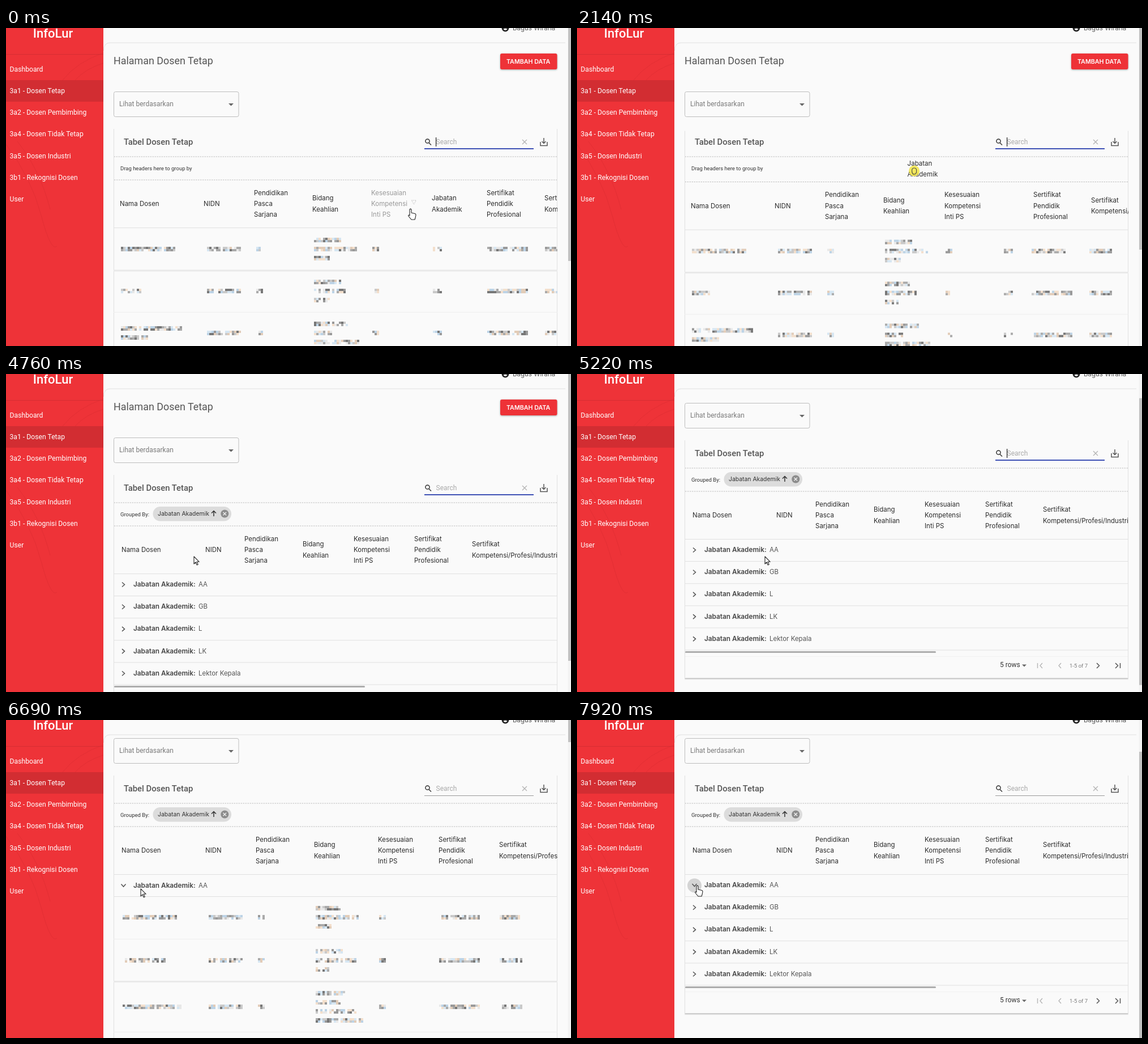
Write an HTML page that moves like this. It is 998x561 px and loops after 8 s.

```html
<!DOCTYPE html>
<html lang="id">
<head>
<meta charset="utf-8">
<title>Dosen Tetap</title>
<style>
html, body { margin: 0; width: 100%; height: 100%; overflow: hidden; background: #fafafa; }
#stage { display: block; width: 998px; height: 561px; }
text { font: 12px Roboto, sans-serif; fill: #333; white-space: pre; }
.geo { font: 400 11.5px Inter, sans-serif; fill: #2c2c2c; }
.thin { fill: #555; }
.tag { font-size: 10.4px; fill: #333; }
.bold { font: 600 11.8px Inter, sans-serif; fill: #444; }
.small { font-size: 9.5px; }
.menu { font-size: 12.2px; fill: #fff; }
.logo { font-size: 22px; font-weight: 500; fill: #fff; text-anchor: middle; }
.h1 { font-size: 17.9px; fill: #555; }
.h2 { font-size: 14.8px; font-weight: 500; fill: #555; }
.soft { fill: #7a7a7a; }
.hint { fill: #aaa; }
.btn { font: 600 10.7px Inter, sans-serif; fill: #fff; }
.line { stroke: #e0e0e0; fill: none; }
.faint { stroke: #eeeeee; fill: none; }
.thick { stroke: #e9e9e9; stroke-width: 3; fill: none; }
.icon { stroke: #555; stroke-width: 1.5; fill: none; }
.pale { stroke: #b5b5b5; stroke-width: 1.4; fill: none; }
.vein { stroke: #e32f34; fill: none; }
</style>
</head>
<body>
<svg id="stage" viewBox="0 0 998 561"></svg>
<script>
const LOOP = 8000;
const HEADS = ['Nama Dosen', 'NIDN', 'Pendidikan|Pasca|Sarjana', 'Bidang|Keahlian',
  'Kesesuaian|Kompetensi|Inti PS', 'Jabatan|Akademik',
  'Sertifikat|Pendidik|Profesional', 'Sertifikat|Kompetensi/Profesi/Industri'];
const MENU = ['Dashboard', '3a1 - Dosen Tetap', '3a2 - Dosen Pembimbing',
  '3a4 - Dosen Tidak Tetap', '3a5 - Dosen Industri', '3b1 - Rekognisi Dosen', 'User'];
const RANKS = ['AA', 'GB', 'L', 'LK', 'Lektor Kepala'];
const TONES = ['#777', '#aaa', '#c9c9c9', '#f3dfcc', '#e2ccb8', '#bcd3e6', '#d6e6f2', '#e8e8e8', '#999'];

const text = (x, y, s, cls = '') => `<text x="${x}" y="${y}" class="${cls}">${s}</text>`;
const path = (d, cls, extra = '') => `<path d="${d}" class="${cls}" ${extra}/>`;
const rect = (x, y, w, h, extra) => `<rect x="${x}" y="${y}" width="${w}" height="${h}" ${extra}/>`;
const rule = (y, cls = 'line') => path(`M190 ${y}H974`, cls);
const group = (id, inner) => `<g id="${id}">${inner}</g>`;

// Header label, its lines centred on cy
function label(s, x, cy) {
  const parts = s.split('|');
  return parts.map((p, k) => text(x, cy + 4 + (k - (parts.length - 1) / 2) * 19.2, p, 'geo')).join('');
}
const heads = xs => HEADS.map((h, i) => xs[i] ? `<g class="col${i}">${label(h, xs[i], 310)}</g>` : '').join('');

function random(seed) {
  let a = seed * 2654435761 >>> 0;
  return () => {
    a = a + 0x6D2B79F5 >>> 0;
    let r = Math.imul(a ^ a >>> 15, a | 1);
    r ^= r + Math.imul(r ^ r >>> 7, r | 61);
    return ((r ^ r >>> 14) >>> 0) / 4294967296;
  };
}

// One line of pixelated text, centred on cy
function mosaic(x, cy, width, rnd) {
  const d = TONES.map(() => '');
  for (let i = 0; i < width; i += 4) {
    const gap = rnd() < .08;
    for (let j = -4; j < 4; j += 4) {
      const tone = Math.floor(rnd() * TONES.length);
      if (!gap && rnd() < .92) d[tone] += `M${x + i} ${cy + j}h4v4h-4z`;
    }
  }
  return d.map((p, i) => p && `<path d="${p}" fill="${TONES[i]}"/>`).join('');
}

// A row is [centre, name widths, field widths]
function rows(list, xs, seed) {
  const shift = [2, 6, 4, 3, 2, 2, 1, 1];
  return list.map(([cy, name, field], r) => xs.map((x, i) => {
    if (!x) return '';
    const lines = [name, [58], [10], field, [12], [14], [72], [38]][i];
    const rnd = random(seed * 97 + r * 11 + i + 1);
    return lines.map((w, k) => mosaic(x + shift[i], cy + (k - (lines.length - 1) / 2) * 16, w, rnd)).join('');
  }).join('')).join('');
}

const FLAT = [[390, [94], [48, 76, 26]], [464, [35], [45, 55, 26]], [538, [108, 45], [58, 30, 78]]];
const OPEN = [[428, [94], [48, 74, 26]], [504, [75], [48, 70, 22]], [586, [104], [50, 44, 70, 82]]];
const frame = bottom => path(`M190.5 178V${bottom}M973.5 178V${bottom}`, 'line');
const flat = (xs, cells, seed) => frame(720) + rule(352.5) + rule(428, 'thick') + rule(501.5, 'faint')
  + heads(xs) + rows(FLAT, cells, seed);
const chevron = (y, id = '') => `<g transform="translate(207.5 ${y})">${path('M-2.5-4L2 0L-2.5 4', 'icon', id)}</g>`;
const rank = (s, cy, id) => chevron(cy + .5, id) + text(225, cy + 4, 'Jabatan Akademik:', 'bold') + text(340, cy + 4, s, 'geo thin');

const LEFT = [201, 349, 438, 541];
const A = [...LEFT, 645, 752, 849, 951];
const B = [...LEFT, 649, 0, 806, 908];
const D = [...LEFT, 645, 0, 801, 903];
const SHUT = [204, 352, 421, 524, 614, 0, 721, 823];
const WIDE = [204, 352, 441, 544, 657, 0, 764, 871];
const withRank = xs => xs.map((x, i) => i === 5 ? 752 : x > 800 ? x - 4 : x);

const scenes = {
  start: flat(A, A, 1),
  lifted: flat(B, withRank(B), 1),
  over: flat(B, withRank(B), 2),
  settled: flat(D, withRank(D), 3),
  shut: rect(190, 560, 784, 37.5, 'fill="#fafafa" style="filter:drop-shadow(0 1px 1px #0006)"') + frame(597) + heads(SHUT)
    + RANKS.map((s, i) => rule(352.5 + i * 39.1) + rank(s, 371 + i * 39.2, i ? '' : 'id="turn"')).join('')
    + rule(548) + rect(191, 550, 443, 3, 'rx="1.5" fill="#adadad"')
    + text(747, 578, '5 rows') + text(870, 578.5, '1-5 of 7', 'small soft')
    + path('M786 573.5h8l-4 4z', '', 'fill="#666"')
    + path('M813.5 571v9M822 571l-4 4.5 4 4.5M855 571l-4 4.5 4 4.5', 'pale')
    + path('M918 571l4.5 4.5-4.5 4.5M951 571l4.5 4.5-4.5 4.5M959.5 571v9', 'icon'),
  open: frame(720) + rule(352.5) + rule(391.5) + rule(466.5, 'faint') + rule(541.5, 'thick') + rule(630.5, 'faint')
    + heads(WIDE) + rank('AA', 371.5, 'id="turned"') + rows(OPEN, WIDE, 5)
};

const toolbar = text(208, 206, 'Tabel Dosen Tetap', 'h2')
  + '<g class="icon" style="stroke:#333"><circle cx="744.5" cy="199.5" r="3.6"/><path d="M747 202.5l4 4"/></g>'
  + text(759.5, 205, 'Search', 'hint')
  + path('M912 197l8 8M920 197l-8 8', 'pale')
  + rect(739, 212, 193, 2, 'id="underline" fill="#3f51b5"')
  + rect(759, 193, 1.2, 16, 'id="caret" fill="#222"')
  + path('M944 201v6.5h12v-6.5M950 194v9M946.5 200l3.5 3.5 3.5-3.5', 'icon');

const chip = text(202, 250.5, 'Grouped By:', 'small')
  + rect(259.5, 234, 138.5, 25.5, 'rx="12.7" fill="#dcdcdc"')
  + text(268, 249.5, 'Jabatan Akademik', 'geo tag')
  + path('M367 251v-9M363 245.5l4-4 4 4', 'icon', 'style="stroke:#333"')
  + '<circle cx="386.3" cy="246.5" r="7" fill="#8c8c8c"/>'
  + path('M383.5 243.7l5.6 5.6M389.1 243.7l-5.6 5.6', '', 'stroke="#eee" stroke-width="1.4"');

const page = text(190, 63.5, 'Halaman Dosen Tetap', 'h1')
  + rect(873, 45, 100.5, 28, 'rx="3" fill="#ee3237" style="filter:drop-shadow(0 1px 1.5px #0005)"')
  + text(884, 62.5, 'TAMBAH DATA', 'btn')
  + rect(190.5, 112.5, 220.5, 44, 'rx="3" fill="none" stroke="#bdbdbd"')
  + text(200, 138, 'Lihat berdasarkan', 'soft')
  + path('M393 133h9l-4.5 4.5z', '', 'fill="#666"')
  + toolbar
  + rect(190.5, 227, 783, 41, 'id="zone" fill="none" stroke="#bdbdbd" stroke-dasharray="2.5 1.5"')
  + group('zoneHint', text(202, 250.5, 'Drag headers here to group by', 'small'))
  + group('chip', chip)
  + '<circle id="ripple" cx="207.5" cy="372" r="12.5" fill="#d4d4d4"/>'
  + `<svg x="190" width="784" height="720" viewBox="190 0 784 720"><g id="table">${
    Object.entries(scenes).map(([id, s]) => group(id, s)).join('')}</g></svg>`
  + path('M-4-4h8l-4 7z', 'pale', 'id="sort" style="stroke-width:1;stroke-dasharray:1.5 1.5"');

const ink = 'fill="#fff" stroke="#222" stroke-width="1.1" stroke-linejoin="round"';
const pointers = {
  hand: path('M-4-8q1.5-1.8 3 0v6l6.5 1.5q1.5.5 1.5 2.5l-1 5-1 3h-6l-5-6q-1-2 1-2l1 1z', '', ink),
  grab: path('M-4-1q0-4 4-4t4 4v3q-1 4-4 4t-4-4z', '', 'fill="none" stroke="#554" stroke-width="1.2"'),
  arrow: path('M-4-8v13l3-3 2.2 5 2-.9-2.2-4.8h4.2z', '', ink),
  beam: path('M-2.5-7h5M0-7V7M-2.5 7h5', '', 'stroke="#222" fill="none"'),
  block: path('M-4-6h6v3l5 3-4 3v3h-7z', '', 'fill="#aaa"') + path('M-4-6h3v12h-3zM2-3l5 3-4 2z', '', 'fill="#555"')
};

const side = rect(0, 0, 172, 561, 'fill="#ee3338"') + rect(0, 92, 172, 38, 'fill="#d22d32"')
  + path('M100 92Q125 60 172 44M122 92Q140 72 172 62M0 205Q45 265 62 330T90 385M20 200Q60 250 78 320', 'vein')
  + path('M0 46.5H172', '', 'stroke="#d62e33"') + text(83, 17, 'InfoLur', 'logo')
  + MENU.map((s, i) => text(6.5, 76.5 + i * 38.3, s, 'menu')).join('');
const bar = path('M172.5 40Q172.5 26 184 26H988', 'line')
  + '<circle cx="882" cy="0" r="6.5" fill="#222"/><path d="M878.5 2q3.5-2.5 7 0q-3.5 4-7 0z" fill="#fafafa"/>'
  + text(895, 3.5, 'Bagus Wirana', 'geo thin');

document.getElementById('stage').innerHTML = rect(0, 0, 998, 561, 'fill="#fafafa"')
  + `<svg y="27" width="998" height="534" viewBox="0 27 998 534"><g id="page">${page}</g></svg>`
  + bar + side + rect(992.5, 0, 5.5, 561, 'fill="#f3f3f3"') + rect(993, 0, 5, 411, 'id="thumb" fill="#c1c1c1"')
  + group('ghost', label(HEADS[5], 0, 9.6))
  + group('pointer', '<circle id="press" r="9.5" fill="#f3e64a" fill-opacity=".88"/>'
    + Object.entries(pointers).map(([id, s]) => group(id, s)).join(''));

const $ = id => document.getElementById(id);
const show = (id, on) => { $(id).style.display = on ? '' : 'none'; };
const move = (id, x, y) => $(id).setAttribute('transform', `translate(${x} ${y})`);
const ease = u => u * u * (3 - 2 * u);
const ramp = (t, a, b) => ease(Math.min(1, Math.max(0, (t - a) / (b - a))));

// Linear path through [time, x, y] points
function along(keys, t) {
  const i = keys.findIndex(k => k[0] > t);
  if (i < 1) return (i ? keys[keys.length - 1] : keys[0]).slice(1);
  const a = keys[i - 1], b = keys[i], u = (t - a[0]) / (b[0] - a[0]);
  return [a[1] + (b[1] - a[1]) * u, a[2] + (b[2] - a[2]) * u];
}
// Last value whose time has come
const pick = (steps, t) => steps.filter(s => s[0] <= t).pop()[1];

const POINTER = [[80, 717, 328], [460, 781, 316], [1180, 781, 317], [1980, 630, 273], [2140, 596, 252],
  [2820, 338, 252], [3050, 306, 252], [3200, 319, 263], [4610, 319, 263], [4760, 336, 330], [5450, 336, 330],
  [5770, 251, 299], [6200, 215, 301], [6500, 215, 301], [7100, 300, 316], [7550, 300, 316], [7800, 215, 301]];
const GHOST = [[1180, 752, 300], [1980, 618, 260], [2140, 584, 239], [2820, 326, 239], [3050, 294, 239],
  [3200, 307, 246], [3300, 245, 244], [3400, 209, 243], [3480, 197, 243]];
const SCENE = [[0, 'start'], [1180, 'lifted'], [2050, 'over'], [2300, 'settled'], [3660, 'shut'], [6310, 'open'], [7860, 'shut']];
const SHAPE = [[0, 'hand'], [1010, 'grab'], [3200, 'arrow'], [5600, 'beam'], [6100, 'hand'], [6600, 'arrow'],
  [7050, 'block'], [7600, 'arrow'], [7750, 'hand']];
const CARET = [[0, 1], [190, 0], [690, 1], [1190, 0], [1690, 1], [2190, 0], [2690, 1], [3200, 0], [3700, 1],
  [4440, 0], [4940, 1], [5440, 0], [5940, 1], [6310, 0]];

function render(t) {
  const scene = pick(SCENE, t), shape = pick(SHAPE, t);
  const grouped = t >= 3660, open = scene === 'open';
  for (const id in scenes) show(id, id === scene);
  for (const id in pointers) show(id, id === shape);

  const scroll = open ? 80 + 5 * ramp(t, 6700, 7100) : 80 * ramp(t, 4900, 5370);
  const grow = scene === 'over' ? 3.5 : scene === 'settled' ? 10 : 0;
  move('page', 0, -scroll);
  move('table', 0, grow);
  $('zone').setAttribute('height', 41 + grow);
  const thumb = { start: 411, lifted: 411, over: 391, settled: 388, shut: 506, open: 39 }[scene];
  $('thumb').setAttribute('y', open ? 0 : scroll * .7);
  $('thumb').setAttribute('height', thumb);

  show('zoneHint', !grouped);
  show('chip', grouped);
  show('caret', pick(CARET, t));
  const blurred = t >= 6310;
  $('underline').setAttribute('fill', blurred ? '#9a9a9a' : '#3f51b5');
  $('underline').setAttribute('y', blurred ? 213 : 212);
  $('underline').setAttribute('height', blurred ? 1 : 2);

  const hover = t < 220 ? 4 : 5;
  for (const i of [4, 5]) {
    document.querySelectorAll(`#start .col${i} text`).forEach(e => { e.style.fill = i === hover ? '#999' : ''; });
  }
  show('sort', t < 1180);
  move('sort', hover === 4 ? 720.5 : 817, 308);

  show('ghost', t >= 1180 && t < 3660);
  move('ghost', ...along(GHOST, t));
  show('press', t >= 860 && t < 3200);
  move('pointer', ...along(POINTER, t));

  show('ripple', t >= 6130 && t < 6600 || t >= 7750);
  $('turn').setAttribute('transform', `rotate(${t >= 7860 ? 90 : 0})`);
  $('turned').setAttribute('transform', `rotate(${90 * ramp(t, 6310, 6460)})`);
}

const begin = performance.now();
function tick(now) {
  render(Math.max(0, now - begin) % LOOP);
  requestAnimationFrame(tick);
}
render(0);
requestAnimationFrame(tick);
</script>
</body>
</html>
```
